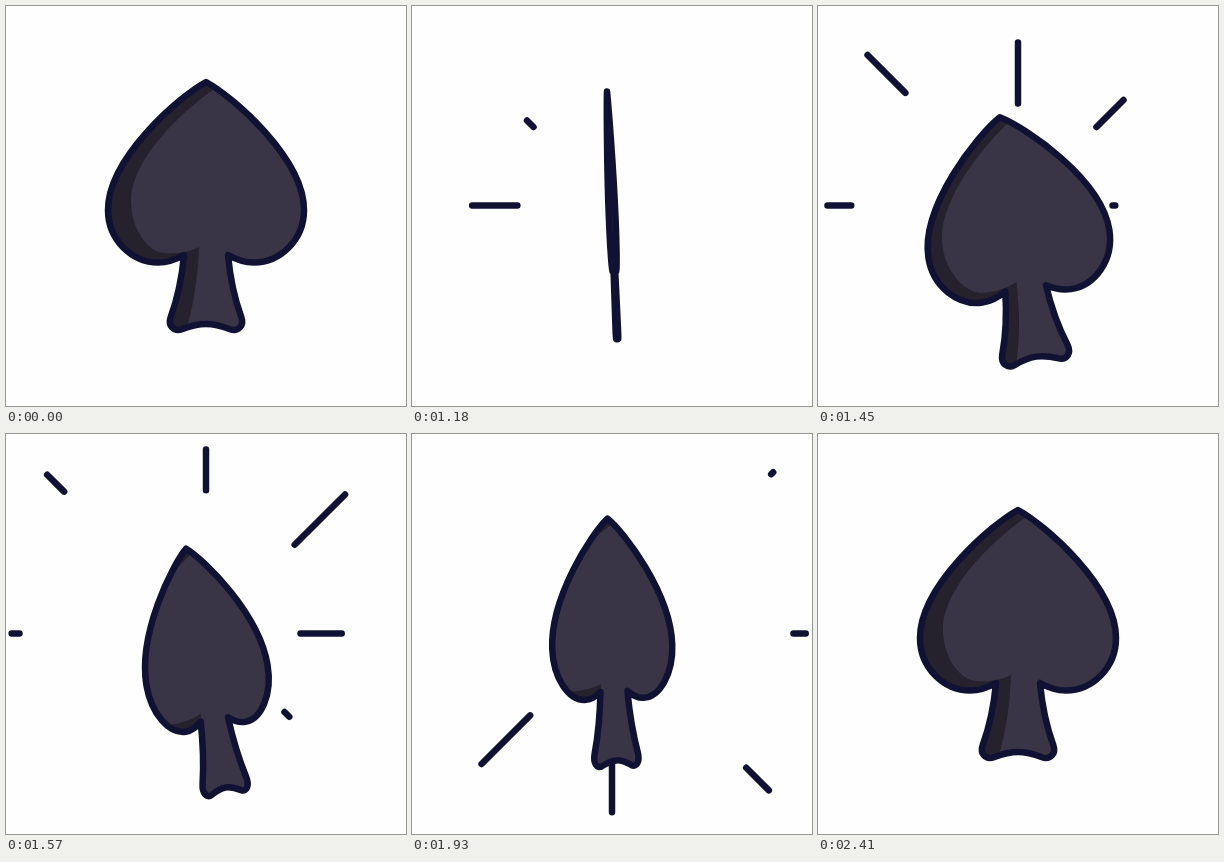
An HTML page with a canvas that plays this animation: 400x400 px, repeating every 2440 ms.

```html
<!DOCTYPE html>
<html lang="en">
<head>
<meta charset="utf-8">
<title>Spinning spade</title>
<style>
  html, body { margin: 0; height: 100%; overflow: hidden; background: #fefefe; }
  canvas { display: block; }
</style>
</head>
<body>
<canvas id="stage" width="400" height="400"></canvas>
<script>
const ctx = document.getElementById('stage').getContext('2d');
const LOOP = 2440, STEP = 30;
const INK = '#111233', LIGHT = '#3a3447', DARK = '#25212d';

// Shapes are centred on the spade's pivot at (200, 198).
const PIVOT_X = 200, PIVOT_Y = 198, TOP = -122;
// Right half of the outline: two control points and an end point per curve.
const curves = [
  [26, -108, 98, -46, 98, 6],
  [98, 36, 74, 58.5, 48, 58.5],
  [38, 58.5, 29, 55, 22, 51],
  [24, 73, 28, 93, 35.3, 113],
  [38.5, 122, 32, 128, 24, 125.2],
  [16, 122.2, 10, 120, 0, 120]
];
const shade = new Path2D('M14 -119 C-24 -94 -75 -44 -75 -3 C-75 27 -57 48 -42 49' +
  ' C-28 50 -17 48 -7 43 C-8 72 -12 100 -20 126 L-120 140 L-120 -140 L14 -140 Z');

// Only the path is narrowed, so the line keeps its weight.
function spadePath(sx) {
  const path = new Path2D();
  path.moveTo(0, TOP);
  for (const [a, b, c, d, e, f] of curves) {
    path.bezierCurveTo(a * sx, b, c * sx, d, e * sx, f);
  }
  for (let i = curves.length - 1; i >= 0; i--) {
    const [a, b, c, d] = curves[i];
    const [x, y] = i ? curves[i - 1].slice(4) : [0, TOP];
    path.bezierCurveTo(-c * sx, d, -a * sx, b, -x * sx, y);
  }
  path.closePath();
  return path;
}

const clamp = v => Math.min(1, Math.max(0, v));
const smooth = v => v * v * (3 - 2 * v);

function bezierEase(x1, y1, x2, y2) {
  const at = (s, a, b) => 3 * s * (1 - s) ** 2 * a + 3 * s * s * (1 - s) * b + s ** 3;
  return v => {
    if (v <= 0 || v >= 1) return clamp(v);
    let lo = 0, hi = 1;
    for (let i = 0; i < 24; i++) {
      const mid = (lo + hi) / 2;
      if (at(mid, x1, x2) < v) lo = mid; else hi = mid;
    }
    return at(lo, y1, y2);
  };
}

const headEase = bezierEase(.32, 0, .2, 1);
const tailEase = bezierEase(.36, 0, .3, .8);
const slowFlip = bezierEase(.32, 0, .29, 1);

// Eight rays fire clockwise from the left, 100 ms apart.
function drawRays(t) {
  ctx.beginPath();
  for (let i = 0; i < 8; i++) {
    const age = t - 1000 - i * 100;
    if (age <= 0 || age >= 667) continue;
    const diagonal = i % 2;
    const inner = diagonal ? 78.5 : 94.5, length = diagonal ? 82.7 : 100;
    const angle = Math.PI + i * Math.PI / 4;
    const dx = Math.round(Math.cos(angle)), dy = Math.round(Math.sin(angle));
    const head = inner + length * headEase(age / 600);
    const tail = inner + length * tailEase((age - 167) / 500);
    ctx.moveTo(200 + dx * tail, 199.5 + dy * tail);
    ctx.lineTo(200 + dx * head, 199.5 + dy * head);
  }
  ctx.stroke();
}

function drawSpade(t) {
  const sway = smooth(clamp((t - 1000) / 550)) - smooth(clamp((t - 1550) / 550));
  const flip = t < 1352 ? smooth(clamp((t - 1000) / 352)) : slowFlip((t - 1352) / 1048);
  const width = Math.abs(1 - 2 * flip);
  const outline = spadePath(width);
  ctx.save();
  ctx.translate(PIVOT_X, PIVOT_Y + 37.2 * sway);
  ctx.rotate(-9.4 * sway * Math.PI / 180);
  ctx.save();
  ctx.clip(outline);
  ctx.fillStyle = LIGHT;
  ctx.fillRect(-150, -150, 300, 300);
  ctx.translate(-15 * (1 - width), 0);
  ctx.fillStyle = DARK;
  ctx.fill(shade);
  ctx.restore();
  ctx.stroke(outline);
  ctx.restore();
}

function render(now) {
  const t = Math.floor((now % LOOP - 10) / STEP) * STEP + 10;
  ctx.fillStyle = '#fefefe';
  ctx.fillRect(0, 0, 400, 400);
  ctx.strokeStyle = INK;
  ctx.lineWidth = 6.5;
  ctx.lineCap = ctx.lineJoin = 'round';
  drawRays(t);
  drawSpade(t);
}

const start = performance.now();
(function loop() {
  render(performance.now() - start);
  requestAnimationFrame(loop);
})();
</script>
</body>
</html>
```
